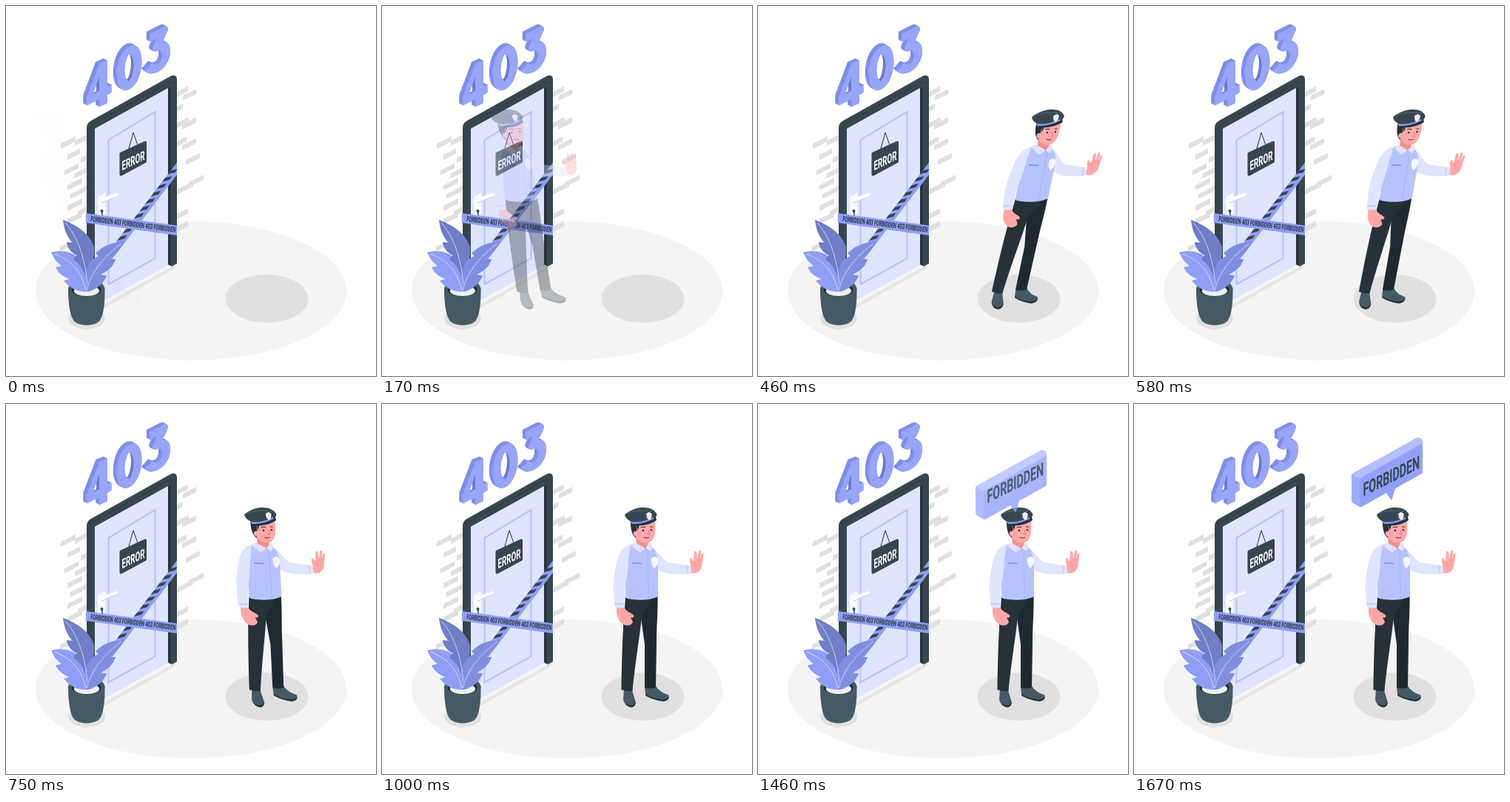
An HTML page that plays this animation: 500x500 px, repeating every 1.71 s.

```html
<!DOCTYPE html>
<html lang="en">
<head>
<meta charset="utf-8">
<title>403 Forbidden</title>
<style>
html, body { margin: 0; width: 100%; height: 100%; overflow: hidden; background: #fff; }
svg { display: block; width: 100%; height: 100%; }
text { font-family: Roboto, sans-serif; font-weight: 700; }
</style>
</head>
<body>
<svg viewBox="0 0 500 500">
  <defs>
    <path id="four" fill-rule="evenodd" d="M126 78L137 73.500V109L142.500 106V117L137 120V131L126 136.500V126L109 134.500V123ZM126 95L118 119L126 115Z"/>
    <ellipse id="zero" rx="11.500" ry="23.500" fill="none" stroke-width="11" transform="matrix(1 -.5 0 1 166.500 83.500)"/>
    <path id="three" d="M-11-23H8L-2-6C15-7 15 23 0 23C-6 23-10 20-13 15" fill="none" stroke-width="11" stroke-linejoin="round" transform="matrix(1 -.5 0 1 205.500 60.500)"/>
    <clipPath id="doorClip"><path d="M109 150H231V420H109Z"/></clipPath>
  </defs>

  <ellipse cx="250" cy="385" rx="210" ry="94" fill="#f4f4f4"/>
  <ellipse cx="352.500" cy="395.500" rx="56" ry="32.500" fill="#e0e0e0"/>
  <g id="bricks" fill="#e0e0e0"></g>

  <g id="door">
    <path d="M120 410L226 351L231 353L128 411Z" fill="#e6e6e6"/>
    <path d="M109 412V165Q109 158 115 155L222 95Q231 91 231 100V348L224 352L219 349V111L120 166V406Z" fill="#37474f"/>
    <path d="M113 409V168Q113 162 118 159L222 102" fill="none" stroke="#2c3a41"/>
    <path d="M219 111L222.500 109V351L219 349Z" fill="#263238"/>
    <path d="M120 166L219 111V350L120 405Z" fill="#dfe4ff"/>
    <path d="M138.500 181L201.500 143V341L138.500 376Z" fill="none" stroke="#b5c0fb" stroke-width="2"/>
    <path d="M124 258L134 253V281L124 287Z" fill="#fafafa"/>
    <path d="M131 264L138 260L150 256" fill="none" stroke="#d4d8e8" stroke-width="5" stroke-linecap="round" stroke-linejoin="round"/>
    <path d="M130 263L138 259L150 255" fill="none" stroke="#fff" stroke-width="4" stroke-linecap="round" stroke-linejoin="round"/>
    <circle cx="129.500" cy="277" r="2" fill="#37474f"/>
    <path d="M129.500 277L130 283" stroke="#37474f" stroke-width="1.600"/>
    <path d="M165.500 194L172 171L178 188" fill="none" stroke="#263238"/>
    <path d="M155.500 199.500L188 184.500V210L155.500 227.500Z" fill="#37474f" stroke="#37474f" stroke-width="4" stroke-linejoin="round"/>
    <text transform="matrix(.56 -.27 0 1 156.500 222.500)" font-size="17.500" fill="#fff">ERROR</text>
    <g clip-path="url(#doorClip)">
      <path d="M235 214.500L138 341" stroke="#8f9ef6" stroke-width="10"/>
      <g id="stripes" fill="#37474f"></g>
    </g>
    <path d="M108 280L231 296.500V310L108 293Z" fill="#8f9ef6"/>
    <text transform="matrix(.56 .072 -.12 1 114 291)" font-size="10" fill="#263238">FORBIDDEN 403 FORBIDDEN 403 FORBIDDEN</text>
  </g>

  <g id="plant">
    <ellipse cx="109" cy="422" rx="25" ry="15" fill="#e0e0e0"/>
    <path d="M84 381C84 405 87 420 92 426C100 433 118 433 126 426C131 420 134 405 133.500 381Z" fill="#455a64"/>
    <ellipse cx="108.700" cy="382" rx="24.700" ry="13" fill="#455a64"/>
    <ellipse cx="108.700" cy="383" rx="20" ry="9.500" fill="#263238"/>
    <ellipse cx="109" cy="385" rx="17" ry="7" fill="#f0f0f0"/>
    <path d="M77 289C96 296 114 308 119 326C120 340 115 361 110 377C104 362 96 349 88 340L96 337C88 333 83 327 82 319L90 320C82 312 78 300 77 289Z" fill="#6f7ec6"/>
    <path d="M160 318C146 319 132 323 121 334L125 338C113 342 106 352 104 385L112 386C124 382 133 374 136 364L128 363C139 358 146 350 148 342L140 342C148 337 155 328 160 318Z" fill="#7f8ee0"/>
    <path d="M61 333C72 330 85 331 94 337L91 343C102 349 110 363 109 386C98 387 85 381 78 371L86 369C77 366 70 360 67 353L75 351C68 346 64 340 61 333Z" fill="#8f9ef6"/>
    <path d="M80 293C96 310 107 340 110 376M156 321C132 339 116 358 109 384M65 335C87 342 103 360 108 384" fill="none" stroke="#dfe4ff" stroke-width=".8"/>
  </g>

  <g id="digits"></g>

  <g id="guard">
    <path d="M327 385L326 399C327 405 331 409 337 409C342 408 344 404 342 400L338 387ZM355 381L356 393C363 397 370 400 379 401C386 401 389 397 387 393C381 391 374 388 370 381Z" fill="#455a64"/>
    <path d="M326.500 398C328 405 331 407 337 407Q342 406 343 402Q343 409 337 410Q328 409 326.500 398ZM356 392C365 397 372 399 380 399Q386 399 388 395Q388 401 380 402Q366 400 356 394Z" fill="#263238"/>
    <path d="M345 261L372.500 258C373 280 371 300 371 320L370 383Q362 386 355 383L355 325L349 282Z" fill="#1f2a30"/>
    <path d="M329 260L364 261C363 276 354 277 351 287C349 310 342 350 338.500 388Q331 389 323.500 386C324 350 325 305 328 275Z" fill="#263238"/>
    <path d="M317 274L327 274C329 281 338 282 340.500 286Q340 290 336 288L339 295Q337 300 329 299C322 297 318 289 317 282Z" fill="#ffa8a7"/>
    <path d="M363 193C372 196 378 209 386 214L417 218.500L418 229C405 231 390 230 383 228C375 226 370 222 367 218Z" fill="#dfe4ff"/>
    <path d="M412 218L413 229.500" stroke="#b5c0fb"/>
    <path d="M336 190C344 187 356 186 363 192C370 197 373 205 373 220V260C362 266 340 266 329 262L328 208Z" fill="#b7c3ff"/>
    <path d="M336 190C325 192 320 201 317 215C314 229 312 240 313 255L314.500 274Q321 277 327 275L328 250C330 238 333 223 333 211Z" fill="#dfe4ff"/>
    <path d="M314 269Q320 272 327 270" fill="none" stroke="#b5c0fb"/>
    <path d="M359 193L360 264" stroke="#9dacf7" stroke-width=".7"/>
    <path d="M338 215L351 215.500" stroke="#7c8ce2" stroke-width="1.600"/>
    <path d="M364 208L369 206L373 209C374 215 371 220 368 222C365 219 363 214 364 208Z" fill="#f5f6ff"/>
    <path d="M343 176L344 190L357 197L361 184Z" fill="#f28f8f"/>
    <path d="M341 187L356 195L348 201L336 191ZM356 195L362 187L366 193L362 199Z" fill="#dfe4ff"/>
    <path d="M336 160H350L346 176L343 181C338 177 336 170 336 160Z" fill="#263238"/>
    <path d="M345 161L369 158C370 171 369 181 364 185C358 190 349 187 344.500 181L343 179C338 178 339 170 344 172Z" fill="#ffa8a7"/>
    <path d="M345 161V171L347 167L348 161Z" fill="#263238"/>
    <circle cx="353" cy="171" r="1.300" fill="#263238"/>
    <circle cx="364" cy="170" r="1.300" fill="#263238"/>
    <path d="M350 167Q353 165 356 167M362 166L366 166" fill="none" stroke="#263238" stroke-width="1.200"/>
    <path d="M360 170L362 176L358 176" fill="none" stroke="#e77573" stroke-width=".9"/>
    <path d="M354 180Q358 182 361 180" fill="none" stroke="#7a3434" stroke-width="1.100"/>
    <path d="M337 155L369 150L371 157C363 163 347 167 336 162Z" fill="#263238"/>
    <path d="M328 150C334 144 346 139 355 140C364 140 370 145 371.500 149C371 153 368 155 363 156C352 159 343 160 337 159C331 156 329 153 328 150Z" fill="#37474f"/>
    <path d="M330 149C340 143 352 143 366 145" fill="none" stroke="#455a64" stroke-width="2"/>
    <path d="M337 160.500Q352 162 367 154" fill="none" stroke="#8c9eff" stroke-width="2.500"/>
    <path d="M357 148L361 146L364.500 148C365 153 363 156 361 157C358 155 357 152 357 148Z" fill="#f0f0f0"/>
    <path d="M417 217C415 211 416 208 418 208L421 213L422 200Q424 197 425.500 201L426 210L428 199Q430 196 431 200L430 210L432 202Q434.500 201 434.500 204L432 221C429 228 423 230 418 228Z" fill="#ffa8a7"/>
    <path d="M421 213Q425 215 424 220M426 209L426 212M430 209L429 213" fill="none" stroke="#e98887" stroke-width=".8"/>
  </g>

  <g id="panel">
    <path d="M294 98Q293 95 297 93L380 47Q384 44 388 47Q390 48 390 54L390 91Q390 94 387 95L353 114L348 130L341 120L309 138Q306 140 303 138L296 134Q294 133 294 130Z" fill="#9dacff"/>
    <path d="M295 95L380 47Q384 44 388 47L390 52L306 101Z" fill="#b3bfff"/>
    <path d="M305 105Q305 101 308 99L386 56Q390 54 390 59V91Q390 94 387 95L353 114L348 130L341 120L309 138Q305 140 305 136Z" fill="#91a1fb"/>
  </g>
  <g id="label">
    <text transform="matrix(.57 -.285 0 1 309.500 125)" font-size="25" fill="#37474f">FORBIDDEN</text>
  </g>
</svg>
<script>
const LOOP = 1710;
const $ = id => document.getElementById(id);
const range = n => [...Array(n).keys()];

// Bricks: left edge, baseline and width
const bricks = [
  74, 193, 20, 93, 189, 16, 83, 208, 17, 101, 212, 8, 79, 229, 19, 93, 233, 16,
  83, 249, 20, 87, 261, 22, 83, 277, 20, 97, 284, 12, 83, 295, 20, 73, 332, 19,
  231, 123, 15, 239, 128, 18, 231, 143, 8, 231, 165, 16, 238, 167, 19,
  231, 190, 13, 238, 195, 19, 243, 215, 19, 247, 245, 20, 231, 255, 22,
  231, 288, 15, 231, 305, 15
];
$("bricks").innerHTML = range(bricks.length / 3).map(i => {
  const [x, y, w] = bricks.slice(i * 3, i * 3 + 3);
  return `<path d="M${x} ${y}l${w} ${-w / 2}v-7l${-w} ${w / 2}z"/>`;
}).join("");

$("stripes").innerHTML = range(13).map(i => {
  const x = 229 - i * 7.6, y = 222 + i * 9.95;
  return `<path d="M${x - 6} ${y}l9 -2l-3.500 5l-10 2.500z"/>`;
}).join("");

// Extruded digits: sides, dark inner walls, flat fronts
const FRONT = "#97a6fc", SIDE = "#7f8fe6", WALL = "#6c7bc9";
const use = (id, color, dx = 0, dy = 0) =>
  `<use href="#${id}" x="${dx}" y="${dy}" ${id === "four" ? "fill" : "stroke"}="${color}"/>`;
const sides = id =>
  range(7).map(i => use(id, SIDE, (i - 6) * .8, (i - 6) * .45)).join("");
const hole = (color, x, y) =>
  `<ellipse rx="7" ry="19" fill="${color}" transform="matrix(1 -.5 0 1 ${x} ${y})"/>`;
$("digits").innerHTML =
  sides("four") +
  `<path d="M126 95L118 119L126 115Z" fill="${WALL}"/><path d="M122 103L117 118L122 115Z" fill="#fff"/>` +
  use("four", FRONT) +
  sides("zero") + hole(WALL, 166.5, 83.5) + hole("#fff", 162, 81) + use("zero", FRONT) +
  sides("three") + use("three", FRONT);

function bezier(x1, y1, x2, y2) {
  const at = (a, b, s) => 3 * (1 - s) ** 2 * s * a + 3 * (1 - s) * s * s * b + s ** 3;
  return x => {
    if (x <= 0) return 0;
    if (x >= 1) return 1;
    let lo = 0, hi = 1;
    for (let i = 0; i < 24; i++) {
      const mid = (lo + hi) / 2;
      if (at(x1, x2, mid) < x) lo = mid; else hi = mid;
    }
    return at(y1, y2, lo);
  };
}
const back = bezier(.36, -.01, .5, 1.38);
const smooth = bezier(.42, 0, .58, 1);
const mix = (a, b, p) => a + (b - a) * p;
const tan = deg => Math.tan(deg * Math.PI / 180);

// [start, end, from angle, to angle]
const swings = [[0, .6, 20, -10], [.6, .8, -10, 2], [.8, 1, 2, 0]];

function drawGuard(t) {
  const u = Math.min(t / 1000, 1);
  const [a, b, from, to] = swings.find(s => u <= s[1]);
  const p = back((u - a) / (b - a));
  const k = mix(tan(from), tan(to), p);
  const dx = a === 0 ? mix(-250, 0, p) : 0;
  $("guard").setAttribute("transform", `matrix(1 0 ${k} 1 ${dx - k * 275} 0)`);
  $("guard").setAttribute("opacity", a === 0 ? Math.min(Math.max(p, 0), 1) : 1);
}

function rise(id, distance, p) {
  $(id).setAttribute("transform", `translate(0 ${distance * (1 - p)})`);
  $(id).setAttribute("opacity", p);
}

function draw(t) {
  drawGuard(t);
  const p = smooth((t - 1000) / 700);
  rise("panel", 82, p);
  rise("label", 46, p);
}

const LEAD = 20;
const start = performance.now();
function tick() {
  draw((performance.now() - start) % LOOP + LEAD);
  requestAnimationFrame(tick);
}
tick();
</script>
</body>
</html>
```
